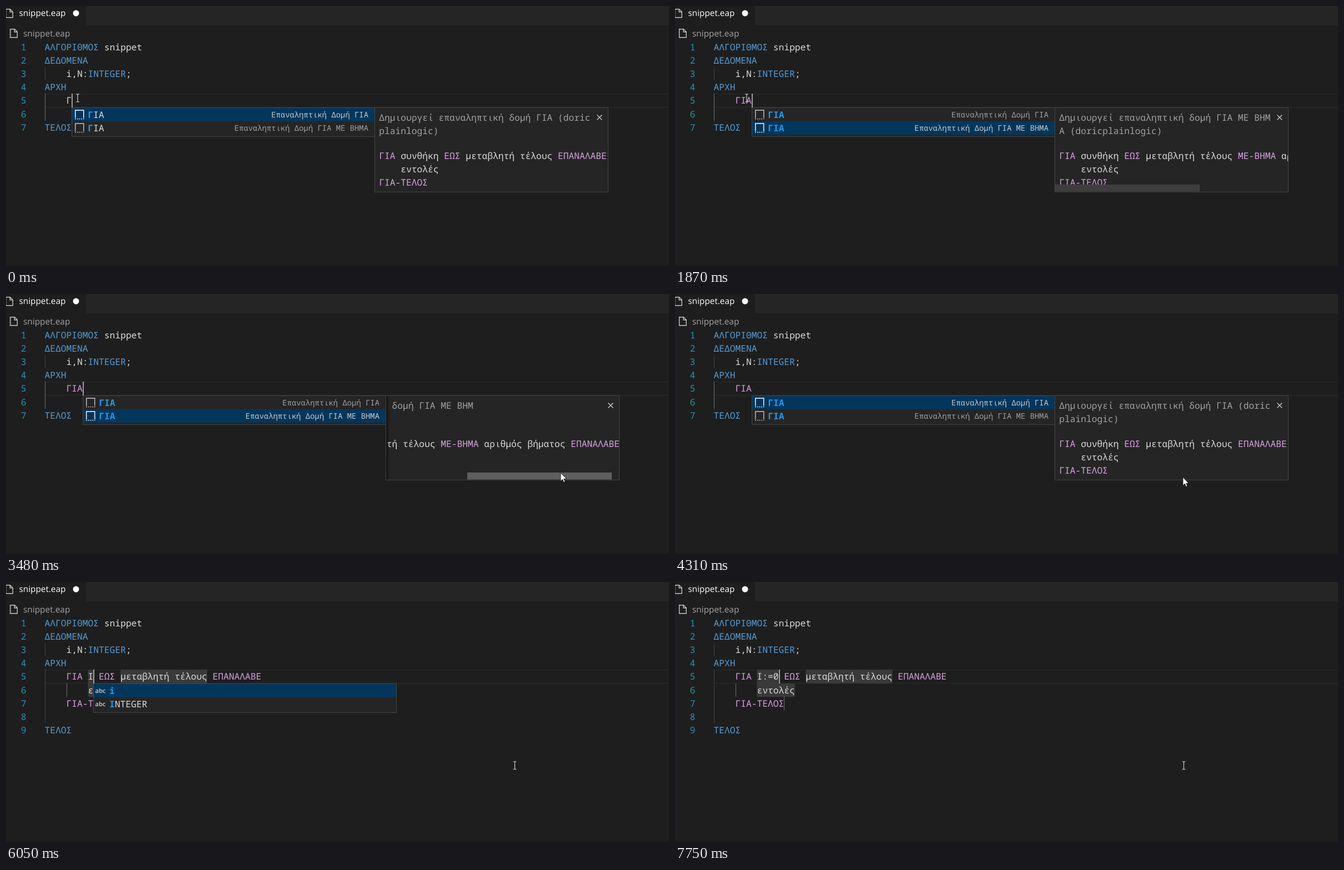
Recreate the animation shown at these times as an HTML page. Size 1193x469 px, loop 8000 ms.

```html
<!DOCTYPE html>
<html lang="el">
<head>
<meta charset="utf-8">
<title>Snippet completion</title>
<style>
  html, body { margin: 0; width: 100%; height: 100%; overflow: hidden; background: #1e1e1e; }
  svg { display: block; }
  text { font: 16.25px "Noto Sans Mono", "DejaVu Sans Mono", monospace; white-space: pre; fill: #dcdcdc; text-rendering: geometricPrecision; }
  .ui { font-family: "Open Sans", "Noto Sans", sans-serif; }
  .tab { font-size: 15.3px; fill: #fff; }
  .crumb { font-size: 15.4px; fill: #a5a5a5; }
  .abc { font-size: 11px; font-weight: 600; fill: #d0d0d0; }
  .num { fill: #2b91af; }
  .kw { fill: #569cd6; }
  .ctl { fill: #d8a0df; }
  .dim { fill: #a2a2a2; }
  .hit { fill: #1e9bf0; font-weight: 700; }
  .info { font-size: 13.87px; text-anchor: end; fill: #a0a0a0; }
  .info.on { fill: #c3ccd4; }
  .slot { fill: #3a3a3a; }
  .picked { fill: #405c79; }
  .guide { fill: #404040; }
  .guide.on { fill: #707070; }
  .panel { fill: #252526; stroke: #454545; }
  .row { fill: #04365c; }
  .icon { fill: none; stroke: #c5c5c5; stroke-width: 1.4; }
  .icon.on { stroke: #fff; }
</style>
</head>
<body>
<svg id="stage" width="1193" height="469" viewBox="0 0 1193 469">
  <defs>
    <linearGradient id="shade">
      <stop offset="0" stop-color="#000" stop-opacity=".55"/>
      <stop offset="1" stop-color="#000" stop-opacity="0"/>
    </linearGradient>
    <path id="doc" d="M.7 .7H8.5L13.3 5.5V15.8H.7ZM8.3 .7V5.7H13.3"/>
    <path id="beam" d="M-3 -7H-1L0 -6L1 -7H3M0 -6V6M-3 7H-1L0 6L1 7H3" fill="none" stroke="#d0d0d0" stroke-width="1.2"/>
    <path id="arrow" d="M0 0V15L3.4 11.8L5.7 17L8 16L5.7 11H10.4Z" fill="#fff" stroke="#111" stroke-width=".8"/>
  </defs>
  <rect width="1193" height="469" fill="#1e1e1e"/>
  <rect x="144" width="1049" height="35" fill="#252526"/>
  <use href="#doc" class="icon" x="-1" y="5"/>
  <text class="ui tab" x="23.5" y="18">snippet.eap</text>
  <circle cx="126" cy="13" r="5.5" fill="#fff"/>
  <use href="#doc" class="icon" x="7" y="41"/>
  <text class="ui crumb" x="31" y="55">snippet.eap</text>
  <path d="M69 158.8H1193M69 182.4H1193" stroke="#282828" stroke-width="1.5"/>
  <g id="view"></g>
</svg>
<script>
const LOOP = 8000, STEP = 90;
const LEFT = 69.5, CHAR = 9.75, TOP = 62, LINE = 24.1;
const THUMB = 260, MAX_DRAG = 146, RATIO = 1.58, GRAB = 842;
const view = document.getElementById("view");

const colX = col => LEFT + col * CHAR;
const rowY = row => TOP + (row - 1) * LINE;
const clamp = (v, lo, hi) => Math.min(hi, Math.max(lo, v));
const at = (track, t) => track.filter(k => k[0] <= t).pop()[1];

const rect = (cls, x, y, w, h) => `<rect class="${cls}" x="${x}" y="${y}" width="${w}" height="${h}"/>`;
// runs: [class, string, class, string, ...]
const text = (x, y, ...runs) => {
  let out = "";
  for (let i = 0; i < runs.length; i += 2) out += `<tspan class="${runs[i]}">${runs[i + 1]}</tspan>`;
  return `<text x="${x}" y="${y}">${out}</text>`;
};
const code = (row, col, ...runs) => text(colX(col), rowY(row) + 18, ...runs);
const slot = (row, col, n, cls = "slot") => rect(cls, colX(col), row === 5 ? 158 : 183, n * CHAR, row === 5 ? 25 : 24.3);

const caretTrack = [[0, 1], [1030, 0], [1500, 1], [1940, 0], [2490, 1], [2940, 0], [3480, 1],
  [3940, 0], [4400, 1], [4870, 0], [5040, 1], [5580, 0], [6050, 1], [6520, 0], [6990, 1]];
const wordTrack = [[0, "Γ"], [90, "ΓΙ"], [460, "ΓΙΑ"], [5040, "συνθήκη"], [6050, "I"],
  [6990, "I:"], [7440, "I:="], [7750, "I:=0"]];
// start, steps, from x, y, to x, y
const legs = [
  [2220, 7, 129, 166, 848, 324],
  [2940, 3, 848, 324, 867, 325],
  [3210, 4, 867, 325, 998, 322.5],
  [3570, 2, 998, 322.5, 1002, 323],
  [3850, 4, 1002, 323, 914, 330.5]
];

function mouseAt(t) {
  const [start, n, x0, y0, x1, y1] = legs.filter(l => l[0] <= t).pop() || legs[0];
  let k = clamp(Math.floor((t - start) / STEP) + 1, 0, n) / n;
  if (n === 7) k = k * k * (3 - 2 * k);
  return [x0 + (x1 - x0) * k, y0 + (y1 - y0) * k];
}

function mouse(t) {
  const [x, y] = mouseAt(t);
  if (t >= 5130) return `<use href="#beam" x="915.5" y="331"/>`;
  return `<use href="#${x > 684 ? "arrow" : "beam"}" x="${x}" y="${y}"/>`;
}

function document_(word, filled, done) {
  let out = "";
  for (let i = 1; i <= (filled ? 9 : 7); i++) out += text(26.7, rowY(i) + 18, "num", i);
  out += code(1, 0, "kw", "ΑΛΓΟΡΙΘΜΟΣ", "", " snippet") + code(2, 0, "kw", "ΔΕΔΟΜΕΝΑ")
    + code(3, 4, "", "i,N:", "kw", "INTEGER", "", ";") + code(4, 0, "kw", "ΑΡΧΗ")
    + rect("guide", 70, 110, 1, 24);
  if (!filled) {
    return out + rect("guide on", 70, 158, 1, 49)
      + code(5, 4, done ? "ctl" : "", word) + code(7, 0, "kw", "ΤΕΛΟΣ");
  }
  const n = word.length;
  return out + rect("guide", 70, 158, 1, 97) + rect("guide on", 109, 183, 1, 24)
    + slot(5, 8, n, n === 7 ? "picked" : "slot") + slot(5, 13 + n, 16) + slot(6, 8, 7)
    + code(5, 4, "ctl", "ΓΙΑ", "", ` ${word} `, "ctl", "ΕΩΣ", "", " μεταβλητή τέλους ", "ctl", "ΕΠΑΝΑΛΑΒΕ")
    + code(6, 8, "", "εντολές") + code(7, 4, "ctl", "ΓΙΑ-ΤΕΛΟΣ")
    + rect("guide on", 196, 206, 1, 25) + code(9, 0, "kw", "ΤΕΛΟΣ");
}

function list(x, sel, row) {
  return rect("panel", x + .5, 183.5, 545, 52) + rect("row", x + 1, 184 + sel * 24, 544, 24)
    + [0, 1].map(i => row(i, i * 24, i === sel ? "on" : "")).join("");
}

function snippets(x, n, sel) {
  const info = ["Επαναληπτική Δομή ΓΙΑ", "Επαναληπτική Δομή ΓΙΑ ΜΕ ΒΗΜΑ"];
  return list(x, sel, (i, dy, on) =>
    `<path class="icon ${on}" d="M${x + 6.7} ${202 + dy}V${188 + dy}H${x + 21.7}V${202 + dy}"/>`
    + `<path class="icon ${on}" stroke-dasharray="2 1.7" d="M${x + 6} ${203.6 + dy}H${x + 22.5}"/>`
    + text(x + 29.3, 201.8 + dy, "hit", "ΓΙΑ".slice(0, n), "", "ΓΙΑ".slice(n))
    + `<text class="info ${on}" x="${x + 534}" y="${200.5 + dy}">${info[i]}</text>`);
}

function words(x) {
  const items = [["i", ""], ["I", "NTEGER"]];
  return list(x, 0, (i, dy) =>
    `<text class="ui abc" x="${x + 3.5}" y="${199.5 + dy}">abc</text>`
    + text(x + 29, 201.8 + dy, "hit", items[i][0], "", items[i][1]));
}

function details(x, sel, t) {
  const drag = sel && t >= 2940 ? clamp(mouseAt(t)[0] - GRAB, 0, MAX_DRAG) : 0;
  const tx = 7.3 - drag * RATIO;
  const head = sel
    ? ["Δημιουργεί επαναληπτική δομή ΓΙΑ ΜΕ ΒΗΜ", "Α (doricplainlogic)"]
    : ["Δημιουργεί επαναληπτική δομή ΓΙΑ (doric", "plainlogic)"];
  const step = sel ? ["ctl", "ΜΕ-ΒΗΜΑ", "", " αριθμός βήματος "] : [];
  const tone = t < 1940 ? "#404040" : t < 2940 ? "#454546" : "#646464";
  return rect("panel", x + 545.5, 183.5, 420, 152)
    + `<svg x="${x + 546}" y="184" width="419" height="151">`
    + text(tx, 23, "dim", head[0]) + text(tx, 47, "dim", head[1])
    + text(tx, 91.6, "ctl", "ΓΙΑ", "", " συνθήκη ", "ctl", "ΕΩΣ", "", " μεταβλητή τέλους ", ...step, "ctl", "ΕΠΑΝΑΛΑΒΕ")
    + text(tx + 4 * CHAR, 115.6, "", "εντολές") + text(tx, 139.6, "ctl", "ΓΙΑ-ΤΕΛΟΣ")
    + (drag ? `<rect width="6" height="151" fill="url(#shade)"/>` : "")
    + (sel ? `<rect x="${drag}" y="138" width="${THUMB}" height="12.5" fill="${tone}" fill-opacity=".93"/>` : "")
    + `<path d="M399.5 12.5l9 9m0 -9l-9 9" stroke="#d0d0d0" stroke-width="1.3"/></svg>`;
}

function render(t) {
  const word = at(wordTrack, t), filled = t >= 5040;
  const x = Math.round(colX((filled ? 8 : 4) + word.length));
  const sel = t >= 1870 && t < 4310 ? 1 : 0;
  let out = document_(word, filled, t >= 460);
  if (at(caretTrack, t)) out += `<rect x="${x + .2}" y="158" width="1.5" height="25" fill="#c8c8c8"/>`;
  if (!filled) out += snippets(x, word.length, sel) + details(x, sel, t);
  else if (t >= 6050 && t < 6990) out += words(x);
  return out + mouse(t);
}

const start = performance.now();
let shown = "";
function tick() {
  const next = render((performance.now() - start) % LOOP);
  if (next !== shown) view.innerHTML = shown = next;
  requestAnimationFrame(tick);
}
tick();
</script>
</body>
</html>
```
